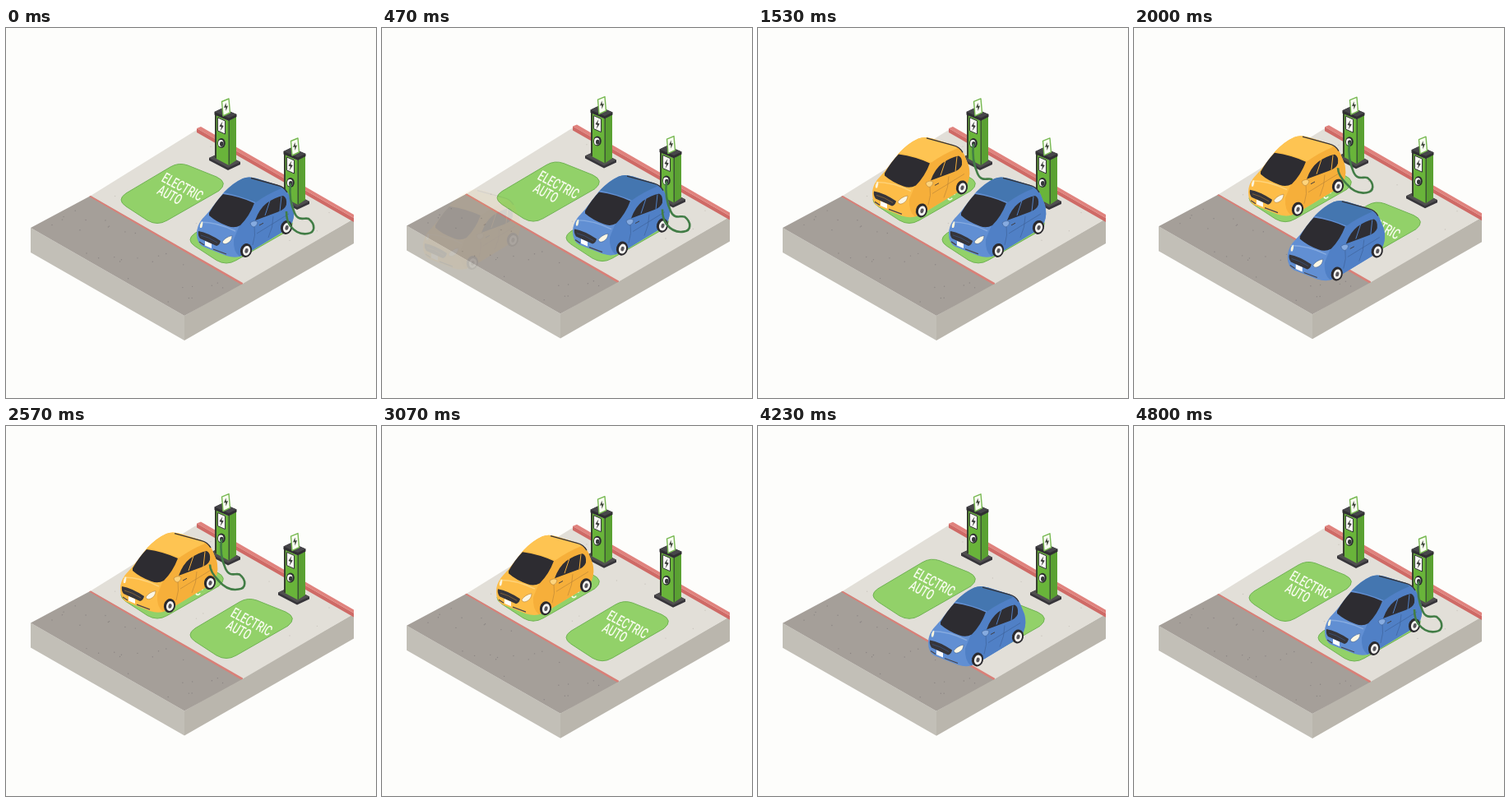
These frames come from a looping animation (450x450 px, 4.83 s). An HTML page:

```html
<!DOCTYPE html>
<html lang="en">
<head>
<meta charset="utf-8">
<title>Charging station</title>
<style>
html, body { margin: 0; width: 100%; height: 100%; overflow: hidden; background: #fdfdfb; }
svg { display: block; width: 100%; height: 100%; }
text { font-family: Roboto, "Liberation Sans", sans-serif; font-weight: 500; font-size: 15px; fill: #f6fbec; }
.hose { fill: none; stroke: #427d46; stroke-width: 2.6; stroke-linejoin: round; }
</style>
</head>
<body>
<svg viewBox="0 0 450 450">
  <defs>
    <g id="pad">
      <path d="M146 201L200 169Q210 163 221 167L256 181Q271 188 259 198L196 234Q184 241 172 234L146 217Q134 209 146 201Z" fill="#92d169" stroke="#70b354"/>
      <text transform="matrix(.7 .37 -.62 1.02 188 186)">ELECTRIC</text>
      <text transform="matrix(.7 .37 -.62 1.02 182.5 201)">AUTO</text>
    </g>
    <g id="pump">
      <path d="M247 158L262 151L285 163V166L270 173L247 161Z" fill="#37353a"/>
      <path d="M247 158L262 151L285 163L270 170Z" fill="#504e50"/>
      <path d="M254 105L271 113V167L254 158Z" fill="#69b43a"/>
      <path d="M271 113L280 107V161L271 167Z" fill="#5aa132"/>
      <path d="M254 105L256 106V159L254 158Z" fill="#37402f"/>
      <path d="M270.500 112L272 112V166L270.500 167Z" fill="#3c5534"/>
      <path d="M253.500 102L263 97.500L280.500 105V108L271 113L253.500 105.500Z" fill="#302f32"/>
      <path d="M253.500 102L263 97.500L280.500 105L271 109.500Z" fill="#47464a"/>
      <path d="M257.500 109L266.500 113V129L257.500 125Z" fill="#fafaf4" stroke="#34353a"/>
      <path d="M263.500 113.500L259.500 119.500L262 120.500L260.500 125.500L264.800 119L262.200 118Z" fill="#3b3c3c"/>
      <ellipse cx="262" cy="140" rx="4.800" ry="6" fill="#2c2d30"/>
      <ellipse cx="261.300" cy="140.300" rx="3.300" ry="4.300" fill="#f8f8f4"/>
      <ellipse cx="262.300" cy="141.100" rx="2.300" ry="3" fill="#36383a"/>
      <path d="M262.500 89.500L271 86L272.500 103L264 107Z" fill="#fafdf2" stroke="#76b850" stroke-width="1.400" stroke-linejoin="round"/>
      <path d="M267.500 91L265 97L267.200 96.500L267.500 101L270 94.500L267.800 95Z" fill="#3b4238"/>
    </g>
    <g id="wheel">
      <ellipse rx="7" ry="8.600" transform="rotate(14)" fill="#2b2a2e"/>
      <ellipse cx=".6" cy=".3" rx="4.500" ry="6" transform="rotate(14)" fill="#f4f3f0"/>
      <ellipse cx=".6" cy=".3" rx="2" ry="2.900" transform="rotate(14)" fill="#56545a"/>
    </g>
    <g id="car">
      <path d="M232 250Q232 241 238 233L247 223L264 201Q276 188 288 183Q295 180 305 183L331 191Q339 194 343 201L349 215Q352 226 348 236L338 247L300 270L284 278Q277 280 268 277L240 266Q232 262 232 250Z" fill="var(--body)"/>
      <path d="M284 240Q295 226 303 212L334 193Q340 195 344 203L349 216Q352 227 348 237L338 247L300 270L284 278Q276 272 277 257Z" fill="var(--side)"/>
      <path d="M265 200Q277 188 288 183Q295 180 305 183L332 191.500L335 195Q318 202 304 212Q284 204 265 200Z" fill="var(--roof)"/>
      <path d="M298 182.500L331 191.500Q338 193 342 200" fill="none" stroke="#343338" stroke-width="1.300"/>
      <path d="M247 225Q255 211 264 202Q285 205 302 213Q296 229 285 240Q278 244 270 241Q256 236 247 228Z" fill="#2d2c31"/>
      <path d="M236 236Q257 236 279 247" fill="none" stroke="var(--light)" stroke-width="1.400"/>
      <path d="M303 234Q308 220 317 213Q327 206 337 204Q342 206 341 215Q339 221 330 224Z" fill="#2f2e33"/>
      <path d="M315 228L321 210M333 223L335 205" fill="none" stroke="var(--side)"/>
      <path d="M302 240Q304 252 300 264M325 229Q325 242 319 255M305 250L344 226" fill="none" stroke="var(--line)" stroke-width=".6"/>
      <path d="M297 237Q302 233 306 236Q306 240 302 242Q298 242 297 237Z" fill="var(--light)" stroke="var(--line)" stroke-width=".6"/>
      <path d="M308 240l5-2.700" stroke="#3f3d42"/>
      <path d="M263 260Q267 254 275 252.500Q275 259 269 262Q264 264 263 260Z" fill="#fbf6e4" stroke="var(--line)" stroke-width=".6"/>
      <path d="M236 243Q235 238 239 235Q240 238 238 243Z" fill="#fbf4dc"/>
      <path d="M234 247Q246 249 261 259Q260 264 256 265L236 256Q233 252 234 247Z" fill="#36353a"/>
      <path d="M237 252Q246 254 257 261" fill="none" stroke="var(--line)" stroke-width=".6"/>
      <path d="M242 259L250 262.500V268L242 264.500Z" fill="#fff"/>
      <path d="M235 260L241 264M252 269L268 275" stroke="#48464c" stroke-width="1.300"/>
      <use href="#wheel" x="292" y="270.500"/>
      <use href="#wheel" x="341" y="242.500"/>
    </g>
  </defs>
  <g id="scene">
    <path d="M30 243L217 350V380L30 273Z" fill="#c2bfb7"/>
    <path d="M217 350L423 232V262L217 380Z" fill="#bab6ad"/>
    <path d="M103 204L235 122L423 232L288 311Z" fill="#e2dfd8"/>
    <path d="M30 243L103 204L288 311L217 350Z" fill="#a59f99"/>
    <g id="specks"></g>
    <path d="M101 205L103 204L288 310V311L286 312Z" fill="#d98078"/>
    <path d="M232 122L423 231V236L232 127Z" fill="#cf6a66"/>
    <path d="M232 122L237 120L423 227V231Z" fill="#e0827d"/>
    <use href="#pad"/>
    <use href="#pad" x="84" y="48.500"/>
    <use href="#pump"/>
    <use href="#pump" x="84" y="48"/>
    <g id="yellow" style="--body:#fdbd48;--side:#f6af3a;--roof:#fec452;--light:#fed47c;--line:#b58238"><use href="#car"/></g>
    <path id="hoseY" class="hose" pathLength="100" d="M262 141C260 157 263 168 267 177C272 188 279 182 284 184C293 191 292 201 283 202C272 204 265 199 259 192C253 186 248 179 248 172"/>
    <g id="blue" style="--body:#618fd3;--side:#5080c6;--roof:#4476b0;--light:#86abe0;--line:#3b5f94"><use href="#car"/></g>
    <path id="hoseB" class="hose" pathLength="100" d="M346 189C344 205 347 216 351 225C356 236 363 230 368 232C377 239 376 249 367 250C356 252 350 246 346 241C342 236 341 230 341 223"/>
  </g>
</svg>
<script>
const LOOP = 4830, BOB = LOOP / 3, TRIP = 800, REACH = 90;
const $ = id => document.getElementById(id);
const clamp = x => Math.max(0, Math.min(1, x));
const ease = x => x < .5 ? 2 * x * x : 1 - 2 * (1 - x) ** 2;
const glide = (t, from, span) => ease(clamp((t - from) / span));

// Small seeded scatter over a parallelogram.
let seed = 11;
const rnd = () => (seed = seed * 16807 % 2147483647) / 2147483647;
function scatter(n, x, y, vx, vy, color) {
  let out = "";
  for (let i = 0; i < n; i++) {
    const u = .04 + .92 * rnd(), v = .06 + .88 * rnd();
    out += `<circle cx="${x + 186 * u + vx * v}" cy="${y + 107 * u + vy * v}" r=".7" fill="${color}"/>`;
  }
  return out;
}
$("specks").innerHTML = scatter(30, 30, 243, 72, -39, "#8b8583") + scatter(18, 103, 204, 132, -80, "#cbc6bf");

// away: 0 is parked, 1 is gone at the far side of the road.
function placeCar(id, x, y, away, slope) {
  const d = REACH * away;
  $(id).setAttribute("transform", `translate(${x - d} ${y + d * slope})`);
  $(id).setAttribute("opacity", clamp((1 - away) / .15));
}
function drawHose(id, k) {
  $(id).setAttribute("stroke-dasharray", `${100 * k} 200`);
  $(id).setAttribute("opacity", k > 0 ? 1 : 0);
}

function render(t) {
  const bob = 1.9 * (Math.cos(2 * Math.PI * t / BOB) - 1);
  $("scene").setAttribute("transform", `translate(0 ${bob})`);
  placeCar("yellow", -93, -48.5, 1 - glide(t, 414, TRIP) + glide(t, 3058, TRIP), .74);
  placeCar("blue", 0, 0, glide(t, 1600, TRIP) - glide(t, 3729, TRIP), .67);
  drawHose("hoseY", glide(t, 1270, 480) - glide(t, 2640, 400));
  drawHose("hoseB", 1 - glide(t, 1050, 400) + glide(t, 4480, 310));
}

const start = performance.now();
function tick() {
  render((performance.now() - start) % LOOP);
  requestAnimationFrame(tick);
}
tick();
</script>
</body>
</html>
```
